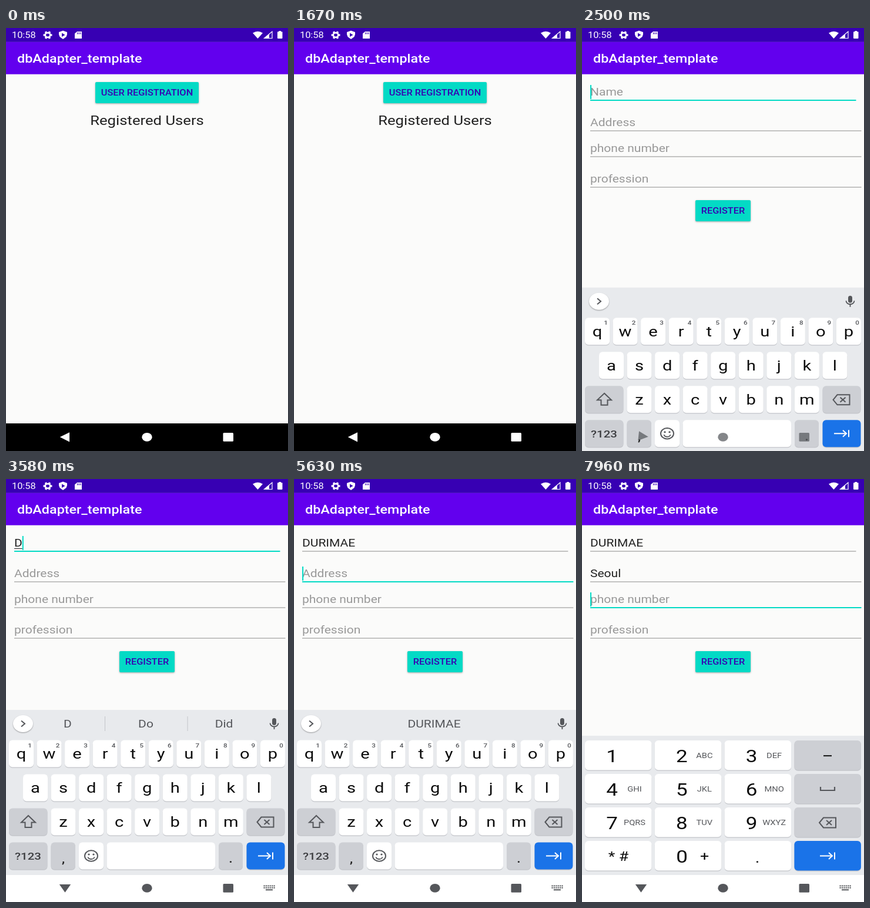
Animation of 480x720 px, one loop 8 s. Source, as an HTML page with a canvas:

```html
<!DOCTYPE html>
<html lang="en">
<head>
<meta charset="utf-8">
<title>Registration form</title>
<style>
html, body { margin: 0; width: 100%; height: 100%; overflow: hidden; background: #fbfbfa; }
canvas { display: block; width: 480px; height: 720px; }
</style>
</head>
<body>
<canvas id="stage" width="480" height="720"></canvas>
<script>
const ctx = document.getElementById('stage').getContext('2d');
const LOOP = 8000;
// The phone screen is 411.43 x 731.43 dp, shown on a 480 x 720 stage.
const SX = 480 / 411.43, SY = 720 / 731.43;
const C = {
  page: '#fbfbfa', status: '#3700b3', bar: '#6200ee', teal: '#03dac5', label: '#3700b3',
  ink: '#212121', hint: '#999', line: '#8c8c8c', white: '#fff',
  board: '#e8eaed', grayKey: '#cdcfd4', edge: '#c2c4c9', blue: '#1a73e8', icon: '#55575b'
};

const NAME = 'DURIMAE', NAME_TIMES = [3420, 3830, 4330, 4710, 4880, 5040, 5250];
const CITY = 'Seoul', CITY_TIMES = [6330, 6500, 6790, 7000, 7330];
const OPEN = 1750, IME = 2370, TAB_ADDRESS = 5580, TAB_PHONE = 7830;
const SUGGEST_LAG = 150, SUGGEST_CLEAR = 6060;
const HINTS = {
  D: ['Do', 'Did'], DU: ['Due', 'Dust'], DUR: ['During', 'Dura'],
  S: ['So', 'See'], Se: ['See', 'Set'], Seo: ['Seoul', 'Son'], Seou: ['Seoul', 'Soul'], Seoul: ['Seoul\'s', 'Soul']
};

const clamp = v => Math.max(0, Math.min(1, v));
const typed = (word, times, t) => word.slice(0, times.filter(s => t >= s).length);

// cubic-bezier(.2, 0, 0, 1), solved by bisection
function ease(x) {
  if (x <= 0 || x >= 1) return clamp(x);
  let lo = 0, hi = 1;
  for (let i = 0; i < 24; i++) {
    const s = (lo + hi) / 2;
    if (.6 * s * (1 - s) ** 2 + s ** 3 < x) lo = s; else hi = s;
  }
  return lo * lo * (3 - 2 * lo);
}

function rect(x, y, w, h, color) {
  ctx.fillStyle = color;
  ctx.fillRect(x, y, w, h);
}

function box(x0, y0, x1, y1, r, color) {
  ctx.fillStyle = color;
  ctx.beginPath();
  ctx.roundRect(x0, y0, x1 - x0, y1 - y0, r);
  ctx.fill();
}

function paint(color, width) {
  ctx.fillStyle = ctx.strokeStyle = color;
  if (width) { ctx.lineWidth = width; ctx.stroke(); } else ctx.fill();
}

function oval(x, y, rx, ry, color, width) {
  ctx.beginPath();
  ctx.ellipse(x, y, rx, ry, 0, 0, 2 * Math.PI);
  paint(color, width);
}

function poly(points, color, width, open) {
  ctx.beginPath();
  for (let i = 0; i < points.length; i += 2) ctx.lineTo(points[i], points[i + 1]);
  if (!open) ctx.closePath();
  paint(color, width);
}

function setFont(size, weight) {
  ctx.font = `${weight} ${size}px Roboto, sans-serif`;
}

function text(str, x, y, size, color, align = 'left', weight = 400) {
  ctx.save();
  ctx.translate(x, y);
  ctx.scale(SX, SY);
  setFont(size, weight);
  ctx.textAlign = align;
  ctx.fillStyle = color;
  ctx.fillText(str, 0, 0);
  ctx.restore();
}

function textWidth(str, size) {
  setFont(size, 400);
  return ctx.measureText(str).width * SX;
}

function shadowed(blur, draw) {
  ctx.save();
  ctx.shadowColor = 'rgba(0,0,0,.35)';
  ctx.shadowBlur = blur;
  ctx.shadowOffsetY = 1;
  draw();
  ctx.restore();
}

function statusBar() {
  const w = C.white;
  rect(0, 0, 480, 23.6, C.status);
  text('10:58', 10, 17.2, 14, w);
  // Gear
  for (let i = 0; i < 6; i++) {
    ctx.save();
    ctx.translate(71, 12);
    ctx.scale(1.1, 1);
    ctx.rotate(i * Math.PI / 3 + Math.PI / 6);
    rect(-1.6, -6.8, 3.2, 3, w);
    ctx.restore();
  }
  oval(71, 12, 4.3, 3.8, w, 2.8);
  // Shield
  poly([97, 4.5, 104, 7, 104, 11, 102.5, 15, 97, 19, 91.5, 15, 90, 11, 90, 7], w);
  poly([95, 8.5, 95, 15, 100.5, 11.8], C.status);
  // Card
  poly([121, 6, 129, 6, 129, 18, 117, 18, 117, 9.5], w);
  for (let i = 0; i < 3; i++) rect(121 + i * 2.6, 7.5, 1.2, 3, C.status);
  // Wi-Fi
  ctx.beginPath();
  ctx.moveTo(428.5, 18);
  ctx.lineTo(420, 8.5);
  ctx.quadraticCurveTo(428.5, 3, 437, 8.5);
  ctx.closePath();
  paint(w);
  // Signal
  poly([439.5, 17.5, 453, 17.5, 453, 6], w, 1.2);
  poly([439.5, 17.5, 448, 17.5, 448, 10], w);
  // Battery
  rect(464.5, 5, 3.5, 2, w);
  box(462, 6.3, 470.5, 18, 1, w);
}

function page() {
  rect(0, 0, 480, 673, C.page);
  rect(0, 0, 480, 23.6, C.status);
  rect(0, 23.6, 480, 55.1, C.bar);
  text('dbAdapter_template', 19, 58.8, 20, C.white, 'left', 500);
}

function button(x0, y0, x1, y1, label) {
  shadowed(3, () => box(x0, y0, x1, y1, 2, C.teal));
  text(label, (x0 + x1) / 2, y0 + 23.2, 14, C.label, 'center', 500);
}

function home() {
  page();
  button(152, 92, 328, 128, 'USER REGISTRATION');
  text('Registered Users', 240, 165, 22, C.ink, 'center');
}

function field(y, right, hint, value, focused, blinkOn) {
  rect(14, focused ? y - 1 : y - .5, right - 14, focused ? 2 : 1, focused ? C.teal : C.line);
  text(value || hint, 14, y - 8, 18, value ? C.ink : C.hint);
  if (!focused) return;
  const w = value ? textWidth(value, 18) : 0;
  rect(14, y - 5, w, 1, C.ink);
  if (blinkOn) rect(14 + w, y - 26, 2, 24, C.teal);
}

function form(t) {
  page();
  const focus = t < TAB_ADDRESS ? 0 : t < TAB_PHONE ? 1 : 2;
  const last = Math.max(0, ...[IME, TAB_ADDRESS, TAB_PHONE, ...NAME_TIMES, ...CITY_TIMES].filter(s => s <= t));
  const blinkOn = t < IME || (t - last) % 1000 < 500;
  const values = [typed(NAME, NAME_TIMES, t), typed(CITY, CITY_TIMES, t), '', ''];
  const hints = ['Name', 'Address', 'phone number', 'profession'];
  [123, 175, 219, 271].forEach((y, i) =>
    field(y, i ? 475.5 : 466.5, hints[i], values[i], focus === i, blinkOn));
  button(193, 293, 287, 329, 'REGISTER');
}

function key(x0, y0, x1, y1, color = C.white) {
  box(x0, y0 + 1.2, x1, y1 + 1.2, 6, C.edge);
  box(x0, y0, x1, y1, 6, color);
}

function backspace(x, y) {
  poly([x - 14, y, x - 7, y - 8.5, x + 14, y - 8.5, x + 14, y + 8.5, x - 7, y + 8.5], C.icon, 2);
  poly([x - 2, y - 4, x + 7, y + 4], C.icon, 2, true);
  poly([x + 7, y - 4, x - 2, y + 4], C.icon, 2, true);
}

function nextIcon(x, y) {
  poly([x - 13, y, x + 8, y], C.white, 2, true);
  poly([x + 2, y - 5.5, x + 8, y, x + 2, y + 5.5], C.white, 2, true);
  poly([x + 12, y - 6, x + 12, y + 6], C.white, 2, true);
}

function suggestions(t) {
  shadowed(2, () => oval(29, 416.5, 17, 14.5, C.white));
  poly([26, 411.5, 32, 416.5, 26, 421.5], C.icon, 2, true);
  box(453, 407, 460, 419, 3.5, C.icon);
  ctx.beginPath();
  ctx.ellipse(456.5, 415.5, 7, 6, 0, 0, Math.PI);
  paint(C.icon, 1.8);
  rect(455.6, 421, 1.8, 5, C.icon);

  const lag = t - SUGGEST_LAG;
  const word = t < SUGGEST_CLEAR ? typed(NAME, NAME_TIMES, lag) : typed(CITY, CITY_TIMES, lag);
  const extra = HINTS[word];
  const put = (s, x) => text(s, x, 423.3, 18, C.icon, 'center');
  if (!extra) return put(word, 238.5);
  [word, ...extra].forEach((s, i) => put(s, 105 + i * 133));
  rect(168, 404, 1, 25, C.edge);
  rect(308.5, 404, 1, 25, C.edge);
}

function letters(row, x, y) {
  [...row].forEach((c, i) => {
    const left = x + i * 47.55;
    key(left, y, left + 42, y + 46);
    text(c, left + 21, y + 31.5, 25, '#0c0c0c', 'center');
    if (row.length === 10) text((i + 1) % 10, left + 35.5, y + 12, 10, C.icon, 'center', 500);
  });
}

function qwerty(t) {
  rect(0, 393, 480, 281, C.board);
  suggestions(t);
  letters('qwertyuiop', 5, 444.5);
  letters('asdfghjkl', 29, 502.5);
  letters('zxcvbnm', 76.5, 560.5);
  key(5, 560.5, 70.5, 606.5, C.grayKey);
  poly([38, 573, 50, 584.5, 43.5, 584.5, 43.5, 593, 32.5, 593, 32.5, 584.5, 26, 584.5], C.icon, 2);
  key(409.5, 560.5, 474.5, 606.5, C.grayKey);
  backspace(441.5, 584);

  const y = 618.5, b = 664.5;
  key(5, y, 70.5, b, C.grayKey);
  text('?123', 37.5, 648, 17.5, '#3c3d40', 'center', 500);
  key(76.5, y, 118, b, C.grayKey);
  text(',', 97.5, 653, 20, C.ink, 'center', 500);
  key(124, y, 166, b);
  oval(145, 641.5, 11, 9.2, C.icon, 2);
  oval(141, 639, 1.7, 1.5, C.icon);
  oval(149, 639, 1.7, 1.5, C.icon);
  ctx.beginPath();
  ctx.ellipse(145, 643, 5.5, 4, 0, .1, Math.PI - .1);
  paint(C.icon, 1.8);
  key(171.5, y, 356, b);
  key(362, y, 403, b, C.grayKey);
  text('.', 382.5, 653, 20, C.ink, 'center', 500);
  key(409.5, y, 474.5, b, C.blue);
  nextIcon(442, 641.5);
}

function numberPad() {
  rect(0, 437, 480, 237, C.board);
  const groups = ['', 'ABC', 'DEF', 'GHI', 'JKL', 'MNO', 'PQRS', 'TUV', 'WXYZ'];
  for (let row = 0; row < 4; row++) {
    const y = 445 + row * 57;
    for (let col = 0; col < 4; col++) {
      const x = 5 + col * 118.8;
      key(x, y, x + 113.5, y + 50.5, col < 3 ? C.white : row < 3 ? C.grayKey : C.blue);
      if (col === 3 || row === 3) continue;
      const n = row * 3 + col;
      text(n + 1, x + 46, y + 36.5, 30, '#0c0c0c', 'center');
      text(groups[n], x + 84.5, y + 30, 12.6, C.icon, 'center');
    }
  }
  text('* #', 62, 650, 23, '#0c0c0c', 'center');
  text('0', 170, 652.5, 30, '#0c0c0c', 'center');
  text('+', 208.5, 650, 23, '#0c0c0c', 'center');
  text('.', 298.5, 653, 25, '#0c0c0c', 'center');
  rect(411, 470, 14, 2.2, C.ink);
  poly([406, 524, 406, 530, 430, 530, 430, 524], C.icon, 2.2, true);
  backspace(418, 585);
  nextIcon(418, 641.5);
}

function keyboard(t) {
  ctx.save();
  ctx.translate(0, 327 * (1 - ease((t - IME) / 285)));
  rect(0, 673, 480, 47, C.white);
  if (t < TAB_PHONE + 40) qwerty(t); else numberPad();
  ctx.restore();
}

function navIcons(t) {
  const p = clamp((t - IME) / 217);
  const color = p > 0 ? C.icon : C.white;
  ctx.globalAlpha = p > 0 ? .3 + .7 * p : 1;
  ctx.save();
  ctx.translate(100.5, 696.3);
  ctx.scale(SX, SY);
  ctx.rotate(-p * Math.PI / 2);
  poly([-7.5, 0, 6.5, -8.3, 6.5, 8.3], color);
  ctx.restore();
  oval(240, 696.3, 8.7, 7.4, color);
  box(369.5, 689, 387, 703.8, 1.5, color);
  if (p === 1) {
    for (let row = 0; row < 2; row++)
      for (let i = 0; i < 6; i++) rect(438.5 + i * 3.4, 691.5 + row * 3.3, 2.2, 2, color);
    rect(442, 698.3, 12, 2, color);
  }
  ctx.globalAlpha = 1;
}

function zoomed(scale, alpha, draw) {
  ctx.save();
  ctx.globalAlpha = alpha;
  ctx.translate(240, 360);
  ctx.scale(scale, scale);
  ctx.translate(-240, -360);
  draw();
  ctx.restore();
}

function draw(t) {
  const p = ease((t - OPEN) / 400);
  if (p < 1) zoomed(1 + .15 * p, 1, home);
  if (p > 0) zoomed(.85 + .15 * p, clamp((t - OPEN - 35) / 50), () => form(t));
  statusBar();
  rect(0, 673, 480, 47, '#000');
  if (t >= IME) keyboard(t);
  navIcons(t);
}

function tick() {
  draw(performance.now() % LOOP);
  requestAnimationFrame(tick);
}
tick();
</script>
</body>
</html>
```
